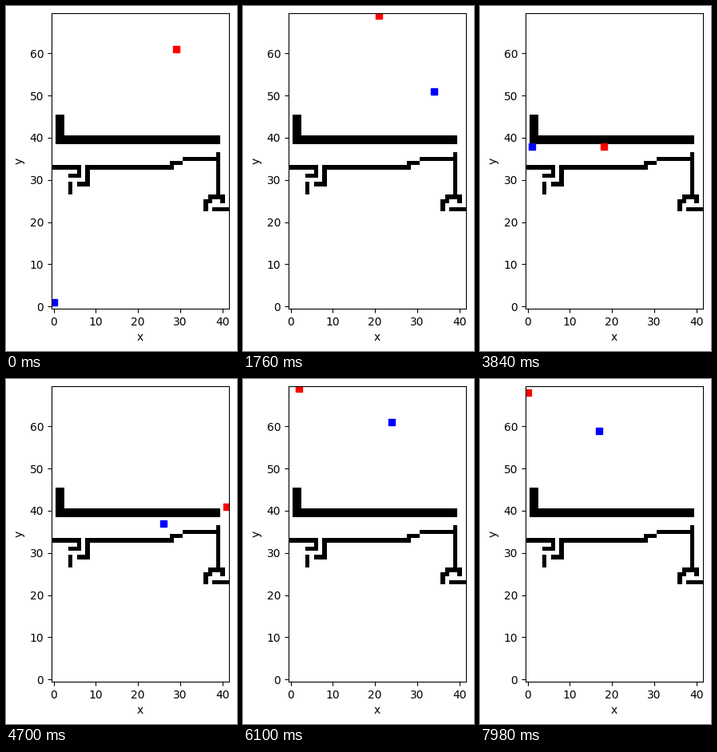
Write a matplotlib script that moves like this. It is 289 by 432 pixels and loops after 8000 ms.

```python
import numpy as np
import matplotlib.pyplot as plt
from matplotlib.animation import FuncAnimation

W, H, DPI = 289, 432, 100
COLS, ROWS = 42, 70
CELL = 5.28                  # pixels per grid cell
LEFT, BASE = 56.92, 378.82   # lower left corner of the axes, from the top
FRAMES, STEP = 400, 20
MOVES = [(dx, dy) for dx in (1, -1) for dy in (1, -1)]
MOVES += [(0, 1), (0, -1), (1, 0), (-1, 0)]

# Walls as chains of corners
WALLS = [
    [(1, 45), (1, 39), (39, 39), (39, 40), (2, 40), (2, 45)],
    [(0, 33), (6, 33), (6, 31), (4, 31)],
    [(4, 27), (4, 29)],
    [(6, 29), (8, 29), (8, 33), (28, 33), (28, 34), (30, 34)],
    [(31, 35), (39, 35)],
    [(39, 36), (39, 26), (37, 26), (37, 25), (36, 25), (36, 23)],
    [(39, 26), (40, 26), (40, 25)],
    [(38, 23), (41, 23)],
]

# Cells to visit: frame, x, y; the route between them is searched
HUNTER = [(0, 0, 1), (88, 34, 51), (149, 27, 60), (205, 11, 37),
          (235, 26, 37), (287, 35, 51), (305, 24, 61), (346, 40, 41),
          (358, 39, 48), (399, 17, 59)]
PREY = [(0, 29, 61), (24, 41, 69), (88, 21, 69), (123, 0, 69),
        (149, 0, 44), (164, 2, 34), (235, 41, 41), (264, 41, 69),
        (305, 2, 69), (308, 0, 69)]


def build_grid():
    grid = np.zeros((ROWS, COLS), bool)
    for chain in WALLS:
        for (xa, ya), (xb, yb) in zip(chain, chain[1:]):
            grid[min(ya, yb):max(ya, yb) + 1, min(xa, xb):max(xa, xb) + 1] = True
    return grid


grid = build_grid()
blocked = np.pad(grid, 1, constant_values=True)


def move_cost(dx, dy):
    return 7 if dx and dy else 5


def distances(goal):
    """Cost to reach the goal from every cell of the padded grid."""
    dist = np.full(blocked.shape, np.inf)
    dist[goal[1] + 1, goal[0] + 1] = 0
    while True:
        best = dist.copy()
        for dx, dy in MOVES:
            best = np.minimum(best, np.roll(dist, (dy, dx), (0, 1)) + move_cost(dx, dy))
        best[blocked] = np.inf
        if np.array_equal(best, dist):
            return dist
        dist = best


def route(start, goal):
    dist = distances(goal)
    cells = [start]
    while cells[-1] != goal:
        x, y = cells[-1]
        dx, dy = min(MOVES, key=lambda m: move_cost(*m) + dist[y + 1 + m[1], x + 1 + m[0]])
        cells.append((x + dx, y + dy))
    return cells


def track(stops):
    """One cell per frame, at an even pace between stops."""
    cells = []
    for (ta, *a), (tb, *b) in zip(stops, stops[1:]):
        path = route(tuple(a), tuple(b))
        pace = np.linspace(0, len(path) - 1, tb - ta, endpoint=False)
        cells += [path[round(p)] for p in pace]
    return cells + [tuple(stops[-1][1:])]


hunter_track = track(HUNTER)
prey_track = track(PREY)
# Cornered, the prey shuffles between two cells
prey_track += [(0, 68 + i % 3 // 2) for i in range(len(prey_track), FRAMES)]

fig = plt.figure(figsize=(W / DPI, H / DPI), dpi=DPI)
ax = fig.add_axes([LEFT / W, 1 - BASE / H, COLS * CELL / W, ROWS * CELL / H])
ax.imshow(grid, cmap="binary", origin="lower", interpolation="nearest",
          aspect="auto")
ax.set_xticks(range(0, COLS, 10))
ax.set_yticks(range(0, ROWS, 10))
ax.set_xlabel("x")
ax.set_ylabel("y")

hunter, = ax.plot([], [], "s", color="blue")
prey, = ax.plot([], [], "s", color="red")
ax.set_xlim(-0.5, COLS - 0.5)
ax.set_ylim(-0.5, ROWS - 0.5)


def draw(i):
    for marker, cells in ((hunter, hunter_track), (prey, prey_track)):
        x, y = cells[i]
        marker.set_data([x], [y])
    return hunter, prey


anim = FuncAnimation(fig, draw, frames=FRAMES, interval=STEP,
                     init_func=lambda: draw(0), repeat=True, repeat_delay=0)
plt.show()
```
